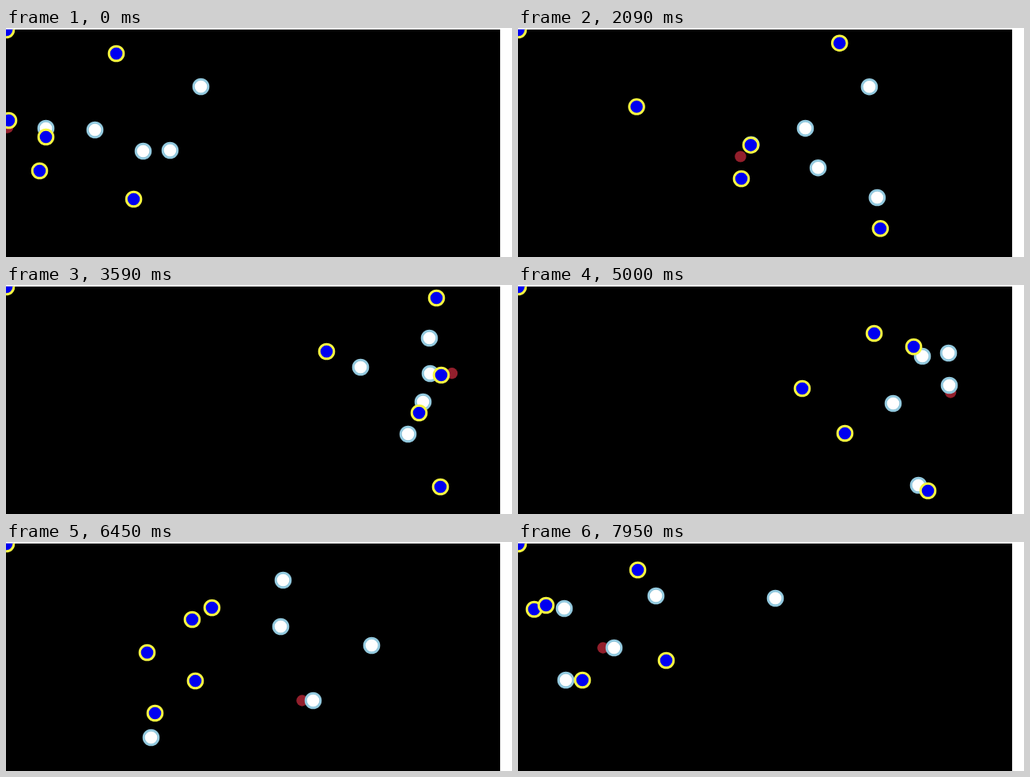
Write an HTML page with a canvas that moves like this. It is 640 px wide and 291 px high and loops after 8 s.

```html
<!DOCTYPE html>
<html lang="en">
<head>
<meta charset="utf-8">
<title>Pitch</title>
<style>
  html, body { margin: 0; width: 100%; height: 100%; overflow: hidden; background: #fff; }
  canvas { display: block; width: 640px; height: 291px; }
</style>
</head>
<body>
<canvas id="stage" width="640" height="291"></canvas>
<script>
const LOOP = 8000, FPS = 22;
const ctx = document.getElementById('stage').getContext('2d');

// Moments at which every player passes a waypoint.
const moments = [0, 32, 61, 79, 110, 142, 175].map(step => step * 1000 / FPS);

function segmentAt(t) {
  let i = 0;
  while (i < moments.length - 2 && t >= moments[i + 1]) i++;
  const span = moments[i + 1] - moments[i];
  return { i, span, u: Math.min(1, (t - moments[i]) / span) };
}

const smooth = u => u * u * (3 - 2 * u);
const mix = (a, b, u) => a + (b - a) * u;

// A run starts from rest and curves smoothly through its waypoints.
function run(...points) {
  const speed = (i, axis) => {
    if (i === 0) return 0;
    const next = Math.min(i + 1, points.length - 1);
    return (points[next][axis] - points[i - 1][axis]) / (moments[next] - moments[i - 1]);
  };
  return t => {
    const { i, span, u } = segmentAt(t), v = 1 - u;
    return [0, 1].map(axis =>
      mix(points[i][axis], points[i + 1][axis], smooth(u)) +
      span * u * v * (v * speed(i, axis) - u * speed(i + 1, axis)));
  };
}

const white = {
  top: run([246, 74], [376, 69], [510, 79], [535, 67], [544, 86], [350, 48], [174, 68]),
  marker: run([50, 127], [222, 132], [381, 158], [536, 112], [511, 90], [347, 107], [58, 84]),
  striker: run([112, 129], [288, 135], [430, 115], [448, 104], [474, 150], [388, 201], [121, 134]),
  passer: run([173, 156], [322, 177], [440, 171], [527, 148], [545, 127], [462, 131], [325, 71]),
  low: run([207, 155], [370, 211], [527, 209], [508, 189], [506, 254], [183, 248], [60, 175])
};

const blue = {
  keeper: () => [0, 2],
  back: run([3, 117], [48, 124], [282, 72], [405, 84], [359, 131], [178, 140], [20, 85]),
  top: run([139, 32], [323, 15], [488, 24], [544, 16], [450, 61], [235, 98], [35, 80]),
  striker: run([50, 138], [215, 146], [390, 145], [550, 114], [500, 78], [260, 83], [151, 35]),
  passer: run([42, 181], [181, 198], [401, 178], [522, 162], [413, 188], [239, 176], [187, 150]),
  low: run([161, 217], [361, 251], [545, 254], [549, 256], [518, 261], [188, 217], [81, 175])
};

// Who has the ball at each moment.
const carriers = [
  blue.back, blue.passer, blue.striker, blue.striker,
  white.passer, white.striker, white.striker
];

// The ball circles its carrier and glides from one carrier to the next.
function ball(t) {
  const { i, u } = segmentAt(t);
  const from = carriers[i](t), to = carriers[i + 1](t), pass = smooth(u);
  const angle = Math.min(Math.PI, (t - 3800) / 825);
  return [
    mix(from[0], to[0], pass) + 14 * Math.cos(angle),
    mix(from[1], to[1], pass) + 9 * Math.sin(angle)
  ];
}

function disc([x, y], radius, fill, ring) {
  ctx.beginPath();
  ctx.arc(x, y, radius, 0, Math.PI * 2);
  ctx.fillStyle = fill;
  ctx.fill();
  if (!ring) return;
  ctx.strokeStyle = ring;
  ctx.lineWidth = 3;
  ctx.stroke();
}

function draw(t) {
  ctx.fillStyle = '#fff';
  ctx.fillRect(0, 0, 640, 291);
  ctx.save();
  ctx.beginPath();
  ctx.rect(0, 1.7, 625, 290);
  ctx.clip();
  ctx.fillStyle = '#000';
  ctx.fill();
  ctx.translate(0.5, 0.5);
  disc(ball(t), 7.2, '#931f2c');
  Object.values(white).forEach(player => disc(player(t), 9.3, '#fff', '#93c9de'));
  Object.values(blue).forEach(player => disc(player(t), 9.3, '#0000f0', '#f6f640'));
  ctx.restore();
}

const start = performance.now();
function tick() {
  const t = (performance.now() - start) % LOOP;
  draw(Math.floor((t + 4.6) * FPS / 1000) * 1000 / FPS);
  requestAnimationFrame(tick);
}
tick();
</script>
</body>
</html>
```
